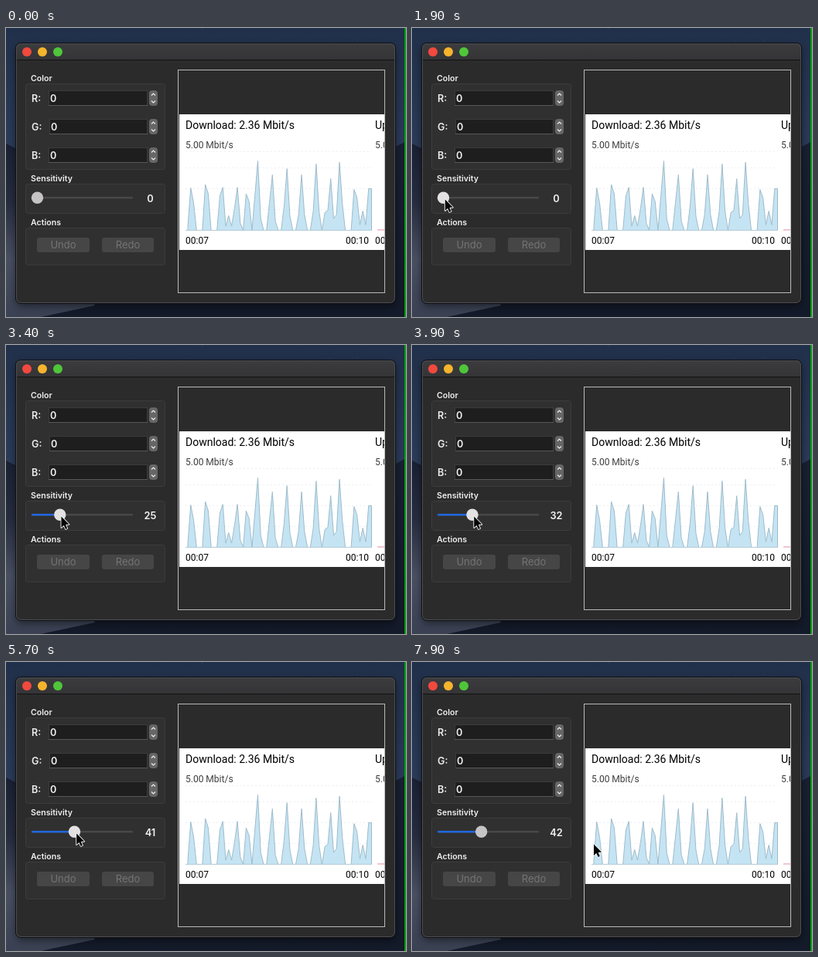
Write an HTML page with a canvas that moves like this. It is 517x375 px and loops after 8000 ms.

```html
<!DOCTYPE html>
<html lang="en">
<head>
<meta charset="utf-8">
<title>Sensitivity slider</title>
<style>
  html, body { margin: 0; width: 100%; height: 100%; overflow: hidden; background: #141a28; }
  canvas { display: block; width: 517px; height: 375px; }
</style>
</head>
<body>
<canvas id="stage" width="517" height="375"></canvas>
<script>
const W = 517, H = 375, LOOP = 8000, STEP = 100;
const ctx = document.getElementById('stage').getContext('2d');
const UI = 'Inter, sans-serif', CHART = 'Roboto, sans-serif';

const ENTER = 200, ARRIVE = 1500, PRESS = 1900, RELEASE = 6300, LEAVE = 6700, REACH = 7600;

// Slider values the drag passes through: [time, value].
const drag = [[2100, 0], [2900, 17], [3900, 32], [4700, 40], [4900, 42], [5200, 42], [5300, 40], [5900, 42]];

// Traffic bursts: [sample, height]; each is a narrow triangle.
const bursts = [
  [1.3, 70], [6.4, 83], [11.6, 78], [14, 19], [16.8, 65], [20.4, 66], [23.8, 105], [28.8, 84],
  [33.9, 86], [39, 72], [44, 86], [47.5, 36], [48.9, 72], [52.1, 95], [57.4, 74], [60, 25], [62.5, 84]
];

const clamp = v => Math.min(1, Math.max(0, v));
const mix = (a, b, u) => a + (b - a) * u;
const progress = (t, from, to) => clamp((t - from) / (to - from));

function sliderValue(t) {
  const next = drag.findIndex(([time]) => time > t);
  if (next === 0) return 0;
  if (next < 0) return drag[drag.length - 1][1];
  const [[t0, v0], [t1, v1]] = drag.slice(next - 1, next + 1);
  return mix(v0, v1, progress(t, t0, t1));
}

const knobX = value => 40.5 + value * 1.17;

function pointerAt(t) {
  const grip = [knobX(sliderValue(t)) + 2.3, 222.5];
  if (t < LEAVE) {
    const u = progress(t, ENTER, ARRIVE) ** 0.5;
    return [mix(75, grip[0], u), mix(5, grip[1], u)];
  }
  const u = progress(t, LEAVE, REACH) ** 1.15;
  const rise = 7 * progress(t, REACH, 7900);
  return [mix(grip[0], 235, u), mix(grip[1], 243.5, u) - rise];
}

function rect(x, y, w, h, fill) {
  ctx.fillStyle = fill;
  ctx.fillRect(x, y, w, h);
}

function round(x, y, w, h, r, fill, stroke) {
  ctx.beginPath();
  ctx.roundRect(x, y, w, h, r);
  if (fill) { ctx.fillStyle = fill; ctx.fill(); }
  if (stroke) { ctx.strokeStyle = stroke; ctx.lineWidth = 1; ctx.stroke(); }
}

function disc(x, y, r, fill) {
  ctx.beginPath();
  ctx.arc(x, y, r, 0, Math.PI * 2);
  ctx.fillStyle = fill;
  ctx.fill();
}

function label(str, x, y, font, fill, align = 'left') {
  ctx.font = font;
  ctx.fillStyle = fill;
  ctx.textAlign = align;
  ctx.fillText(str, x, y);
}

function trace(points) {
  ctx.beginPath();
  points.forEach(([x, y]) => ctx.lineTo(x, y));
}

function shape(points, fill) {
  trace(points);
  ctx.fillStyle = fill;
  ctx.fill();
}

function line(points, stroke, width = 1) {
  trace(points);
  ctx.strokeStyle = stroke;
  ctx.lineWidth = width;
  ctx.stroke();
}

function fade(y0, y1, ...colors) {
  const g = ctx.createLinearGradient(0, y0, 0, y1);
  colors.forEach((c, i) => g.addColorStop(i / (colors.length - 1), c));
  return g;
}

function stars() {
  let seed = 7;
  const random = () => (seed = seed * 16807 % 2147483647) / 2147483647;
  for (let i = 0; i < 60; i++) {
    rect(random() * W, random() * 140, 1, 1, `rgba(150,170,205,${0.3 * random()})`);
  }
}

function desktop() {
  rect(0, 0, W, H, fade(0, 150, '#21304a', '#2b3b59'));
  stars();
  shape([[0, 150], [12, 156], [500, 156], [W, 147], [W, H], [0, H]],
    fade(150, H, '#192033', '#161d2e', '#131a29'));
  shape([[0, 150], [12, 160], [115, 360], [45, H], [0, H]],
    fade(150, H, '#1a2134', '#272d40', '#4a5063', '#3a4153'));
  rect(515, 0, 2, H, '#0ba012');
}

function windowFrame() {
  ctx.save();
  ctx.shadowColor = 'rgba(0,0,0,.5)';
  ctx.shadowBlur = 12;
  ctx.shadowOffsetY = 4;
  round(13, 20, 490, 337, 6, '#2b2b2b');
  ctx.restore();
  round(12.5, 19.5, 491, 338, 6.5, null, '#0d0f14');
  round(13, 20, 490, 22, [6, 6, 0, 0], fade(20, 42, '#3c3c3e', '#343436'));
  rect(13, 41, 490, 1, '#131313');
  round(13.5, 20.5, 489, 336, 6, null, '#4d4e51');
  ['#f2493f', '#f6b42d', '#4fc63a'].forEach((c, i) => disc(27 + i * 20, 31, 6, c));
}

function group(title, y, h) {
  label(title, 32, y - 3, `600 10.6px ${UI}`, '#f0f0f0');
  round(25.5, y + .5, 180, h, 3, '#303030', '#3c3c3c');
}

function colorRow(name, y) {
  label(name, 33, y + 4.5, `600 12.6px ${UI}`, '#ededed');
  const x = Math.round(43 + ctx.measureText(name).width);
  rect(x, y - 10, 183 - x, 20, '#3b3b3b');
  rect(x + 1, y - 9, 181 - x, 18, '#1e1e1e');
  rect(x, y + 9, 183 - x, 1, '#585858');
  label('0', x + 2, y + 5, `600 12.6px ${UI}`, '#f2f2f2');
  round(185, y - 10, 11, 20, 4, '#666666');
  [-1, 1].forEach(d => line(
    [[188, y + d * 3.5], [190.5, y + d * 6], [193, y + d * 3.5]], '#eeeeee', 1.2));
}

function button(text, x, w) {
  round(x, 272, w, 19, 3, '#464646');
  label(text, x + w / 2, 286.3, `13px ${UI}`, '#747474', 'center');
}

function slider(value, pressed) {
  const x = knobX(value);
  round(33, 219, 131, 2.6, 1.3, '#484848');
  if (value > 0) round(33, 219, x - 33, 2.6, 1.3, '#1f66e0');
  disc(x, 220.2, 7.7, pressed ? '#e3e1e2' : '#c5c3c4');
  label(value, 186.5, 226, `600 12.8px ${UI}`, '#f2f2f2', 'center');
}

function trafficCurve(x0, x1, base) {
  const last = 63, points = [[x0, base]];
  for (let i = 0; i <= last; i++) {
    const heights = bursts.map(([at, h]) => h * (1 - Math.abs(i - at) / 1.4));
    points.push([mix(x0, x1, i / last), base - Math.max(0, ...heights)]);
  }
  return [...points, [x1, base]];
}

function chart() {
  const base = 262.5;
  rect(224, 112, 265, 176, '#ffffff');
  ctx.save();
  ctx.beginPath();
  ctx.rect(224, 112, 265, 176);
  ctx.clip();

  ctx.setLineDash([2, 3]);
  [160.5, 181.5, 208.5, 235.5].forEach(y => line([[232, y], [473, y]], '#eceff1'));
  ctx.setLineDash([]);

  const curve = trafficCurve(235, 472.5, base);
  shape(curve, '#c5e4f3');
  line(curve, '#9fbccb');
  line([[232, base], [473, base]], '#b4cbd6');
  rect(480, 261, 9, 2, '#f0c6cf');

  [['Download: 2.36 Mbit/s', 232], ['Upload: 0.04 Mbit/s', 477]].forEach(([title, x]) => {
    label(title, x, 131.4, `14px ${CHART}`, '#000000');
    label('5.00 Mbit/s', x, 156.3, `12px ${CHART}`, '#3c3c3c');
    label('00:07', x, 280, `12px ${CHART}`, '#000000');
  });
  label('00:10', 469, 280, `12px ${CHART}`, '#000000', 'right');
  ctx.restore();
}

function preview() {
  ctx.strokeStyle = '#b9b9b9';
  ctx.lineWidth = 1;
  ctx.strokeRect(222.5, 54.5, 267, 289);
  chart();
}

function pointer([x, y]) {
  ctx.save();
  ctx.translate(x, y);
  trace([[0, 0], [0, 14.5], [3.3, 11.4], [5.6, 16.4], [7.8, 15.4], [5.6, 10.6], [10, 10.3]]);
  ctx.closePath();
  ctx.lineJoin = 'round';
  ctx.lineWidth = 1.8;
  ctx.strokeStyle = '#f4f4f4';
  ctx.stroke();
  ctx.fillStyle = '#050505';
  ctx.fill();
  ctx.restore();
}

function draw(t) {
  desktop();
  windowFrame();
  group('Color', 72, 111);
  ['R:', 'G:', 'B:'].forEach((name, i) => colorRow(name, 91 + i * 37));
  group('Sensitivity', 202, 38);
  slider(Math.round(sliderValue(t)), t >= PRESS && t < RELEASE);
  group('Actions', 259, 48);
  button('Undo', 40, 68);
  button('Redo', 124, 67);
  preview();
  if (t >= ENTER) pointer(pointerAt(t));
}

const start = performance.now();
function tick() {
  const t = (performance.now() - start) % LOOP;
  draw(Math.floor(t / STEP) * STEP);
  requestAnimationFrame(tick);
}
tick();
</script>
</body>
</html>
```
